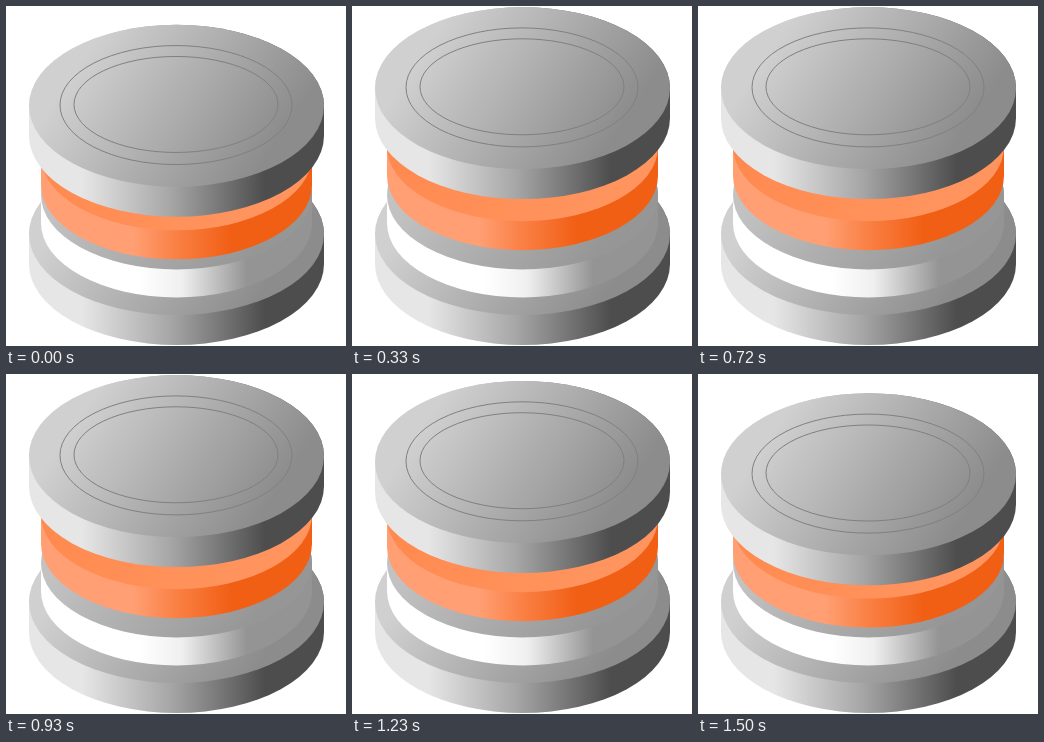
These frames come from a looping animation (340 px wide and 340 px high, 2.07 s). An HTML page with a canvas:

```html
<!DOCTYPE html>
<html lang="en">
<head>
<meta charset="utf-8">
<title>Lifting layers</title>
<style>
html, body { margin: 0; width: 100%; height: 100%; overflow: hidden; background: #fff; }
canvas { display: block; }
</style>
</head>
<body>
<canvas id="stage" width="340" height="340"></canvas>
<script>
const ctx = document.getElementById('stage').getContext('2d');
const LOOP = 2070;
const STEP = 30;
const LIFT = 18.2;
const CX = 170.5;

const metal = {
  rx: 147.5, ry: 81, depth: 30,
  face: [[0, '#d0d0d0'], [1, '#8c8c8c']],
  wall: [[0.18, '#e6e6e6'], [0.48, '#a6a6a6'], [0.8, '#4d4d4d']]
};
const white = {
  rx: 135.5, ry: 74.4, depth: 28,
  face: [[0, '#c2c2c2'], [1, '#969696']],
  wall: [[0.36, '#ffffff'], [0.52, '#efefef'], [0.76, '#949494']]
};
const orange = {
  rx: 135.5, ry: 74.4, depth: 29,
  face: [[0, '#ff8a50'], [1, '#ff945e']],
  wall: [[0.34, '#ff9f73'], [0.5, '#fa8044'], [0.7, '#f15f15']]
};

function gradient(x1, y1, x2, y2, stops) {
  const g = ctx.createLinearGradient(x1, y1, x2, y2);
  for (const [at, color] of stops) g.addColorStop(at, color);
  return g;
}

function cylinder({ rx, ry, depth, face, wall }, cy) {
  ctx.beginPath();
  ctx.ellipse(CX, cy, rx, ry, 0, Math.PI, 2 * Math.PI);
  ctx.ellipse(CX, cy + depth, rx, ry, 0, 0, Math.PI);
  ctx.closePath();
  ctx.fillStyle = gradient(CX - rx, 0, CX + rx, 0, wall);
  ctx.fill();

  ctx.beginPath();
  ctx.ellipse(CX, cy, rx, ry, 0, 0, 2 * Math.PI);
  const dx = rx * 0.58, dy = ry * 0.71;
  ctx.fillStyle = gradient(CX - dx, cy - dy, CX + dx, cy + dy, face);
  ctx.fill();
}

function groove(cy, rx, ry) {
  ctx.beginPath();
  ctx.ellipse(170, cy, rx, ry, 0, 0, 2 * Math.PI);
  ctx.strokeStyle = '#808080';
  ctx.lineWidth = 1;
  ctx.stroke();
}

// Steady rise, hold at the top, steady fall, rest.
function liftAt(t) {
  const rise = (t + 10) / 340;
  const fall = (1500 - t) / 400;
  return LIFT * Math.max(0, Math.min(1, rise, fall));
}

function draw(now) {
  const t = Math.floor((now % LOOP) / STEP) * STEP;
  const lift = liftAt(t);
  ctx.fillStyle = '#fff';
  ctx.fillRect(0, 0, 340, 340);
  cylinder(metal, 228);
  cylinder(white, 189);
  cylinder(orange, 150.2 - lift * 0.52);
  const top = 100.3 - lift;
  cylinder(metal, top);
  groove(top - 0.7, 116, 59.5);
  groove(top - 1.3, 102, 48);
}

let start = null;
function tick(now) {
  if (start === null) start = now;
  draw(now - start);
  requestAnimationFrame(tick);
}
draw(0);
requestAnimationFrame(tick);
</script>
</body>
</html>
```
